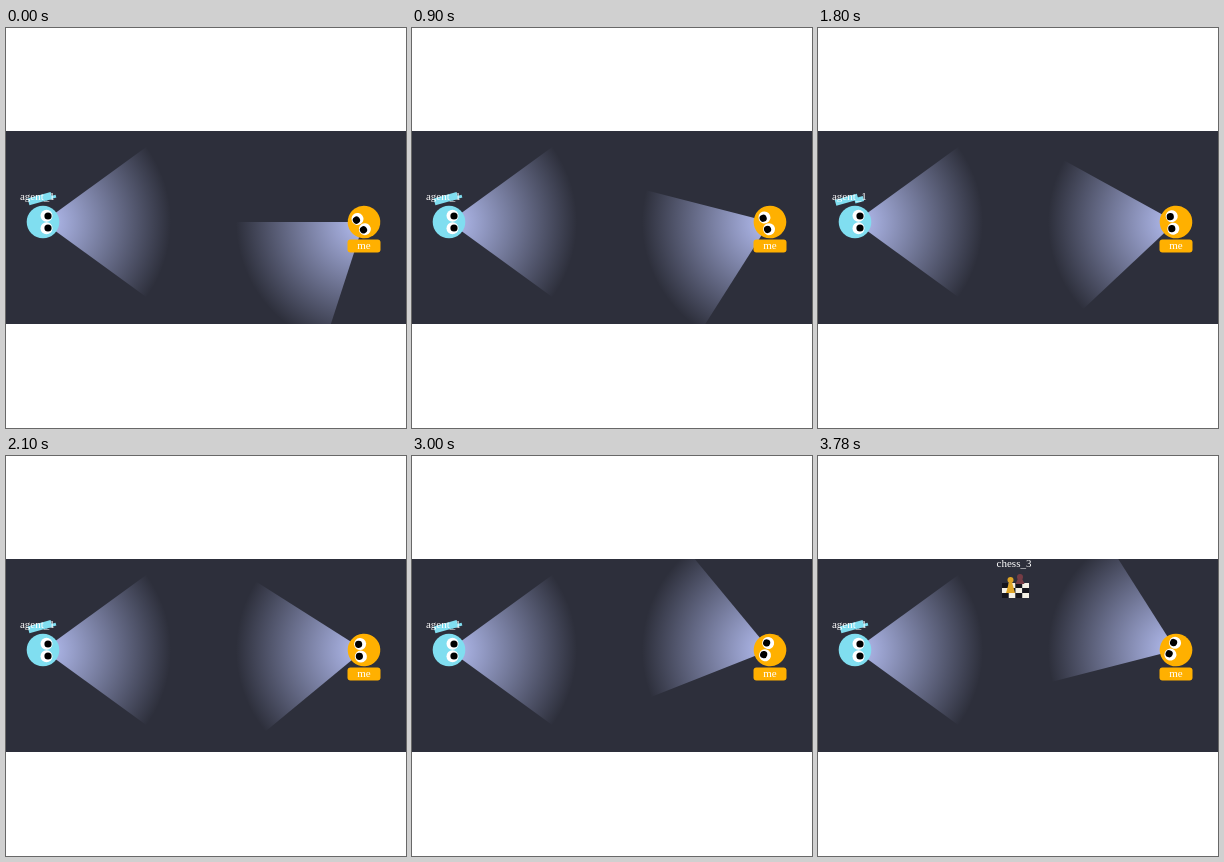
These frames come from a looping animation (400x400 px, 4500 ms). An HTML page with a canvas:

```html
<!DOCTYPE html>
<html lang="en">
<head>
<meta charset="utf-8">
<title>Agents</title>
<style>
html, body { margin: 0; width: 100%; height: 100%; overflow: hidden; background: #fff; }
canvas { display: block; }
</style>
</head>
<body>
<canvas id="stage" width="400" height="400"></canvas>
<script>
const ctx = document.getElementById('stage').getContext('2d');
const LOOP = 4500, TICK = 60, FIRST_MOVE = 360, LAST_MOVE = 3780;
const NIGHT = '#2d2f3b', BLUE = '#80def0', ORANGE = '#ffb000';
const RANGE = 128, HALF_VIEW = Math.PI / 5, TURN = Math.PI / 50;
const clamp = (value, low, high) => Math.min(high, Math.max(low, value));

const beam = ctx.createRadialGradient(0, 0, 0, 0, 0, RANGE);
beam.addColorStop(0, 'rgba(190, 200, 255, .95)');
beam.addColorStop(1, 'rgba(190, 200, 255, 0)');

function at(x, y, angle, paint) {
  ctx.save();
  ctx.translate(x, y);
  ctx.rotate(angle);
  paint();
  ctx.restore();
}

function disc(x, y, r, color) {
  ctx.fillStyle = color;
  ctx.beginPath();
  ctx.arc(x, y, r, 0, Math.PI * 2);
  ctx.fill();
}

function box(x, y, w, h, color, radius = 0) {
  ctx.fillStyle = color;
  ctx.beginPath();
  ctx.roundRect(x, y, w, h, radius);
  ctx.fill();
}

function label(text, x, y) {
  ctx.fillStyle = '#fff';
  ctx.font = '11px "Liberation Serif", serif';
  ctx.textAlign = 'center';
  ctx.fillText(text, x, y);
}

function drawBeam() {
  ctx.fillStyle = beam;
  ctx.beginPath();
  ctx.moveTo(0, 0);
  ctx.arc(0, 0, RANGE, -HALF_VIEW, HALF_VIEW);
  ctx.fill();
}

function drawHead(color) {
  disc(0, 0, 16.3, color);
  for (const side of [-1, 1]) {
    disc(3.5, side * 6.3, 6, '#fff');
    disc(5, side * 6, 3.6, '#000');
  }
}

// A small tag above the agent flaps between stretched and folded.
function drawTag(t) {
  const stretched = t % 360 < 120;
  at(31, 171, -0.28, () => {
    if (stretched) {
      box(-14, -3, 23, 6, BLUE);
      box(5, 1, 9, 5, BLUE);
    } else {
      box(-9, -3, 24, 7, BLUE);
      box(8, 1, 11, 3, BLUE);
    }
  });
  label('agent_1', 31.3, 172);
}

function drawPiece(x, base, height, color) {
  ctx.fillStyle = color;
  ctx.beginPath();
  ctx.moveTo(x - 4.5, base);
  ctx.lineTo(x, base - height);
  ctx.lineTo(x + 4.5, base);
  ctx.fill();
  disc(x, base - height + 3, 3, color);
}

function drawChess() {
  label('chess_3', 196, 111);
  for (let i = 0; i < 12; i++) {
    const col = i % 4, row = Math.floor(i / 4);
    box(184 + col * 6.75, 127 + row * 5, 6.75, 5, (row + col) % 2 ? '#f4f0e4' : '#15151c');
  }
  drawPiece(202, 128, 10, '#753c45');
  drawPiece(192.5, 137, 16, '#dfa526');
}

function draw(t) {
  // The seeker turns in small steps until it faces the chess set.
  const turns = t < FIRST_MOVE ? 0 : clamp(Math.floor((t - 45) / 208), 0, 16);
  const heading = Math.PI * 0.8 + turns * TURN;

  box(0, 0, 400, 400, '#fff');
  ctx.save();
  ctx.beginPath();
  ctx.rect(0, 103, 400, 193);
  ctx.clip();
  box(0, 103, 400, 193, NIGHT);

  at(37, 194, 0, drawBeam);
  at(358, 194, heading, drawBeam);
  if (t >= 3420) drawChess();
  at(37, 194, 0, () => drawHead(BLUE));
  at(358, 194, heading, () => drawHead(ORANGE));
  drawTag(t);
  box(341.5, 211.5, 33, 13, ORANGE, 3);
  label('me', 358, 220.5);
  ctx.restore();
}

const start = performance.now();
function frame() {
  const t = (performance.now() - start) % LOOP;
  draw(clamp(Math.floor(t / TICK) * TICK, FIRST_MOVE - TICK, LAST_MOVE));
  requestAnimationFrame(frame);
}
frame();
</script>
</body>
</html>
```
